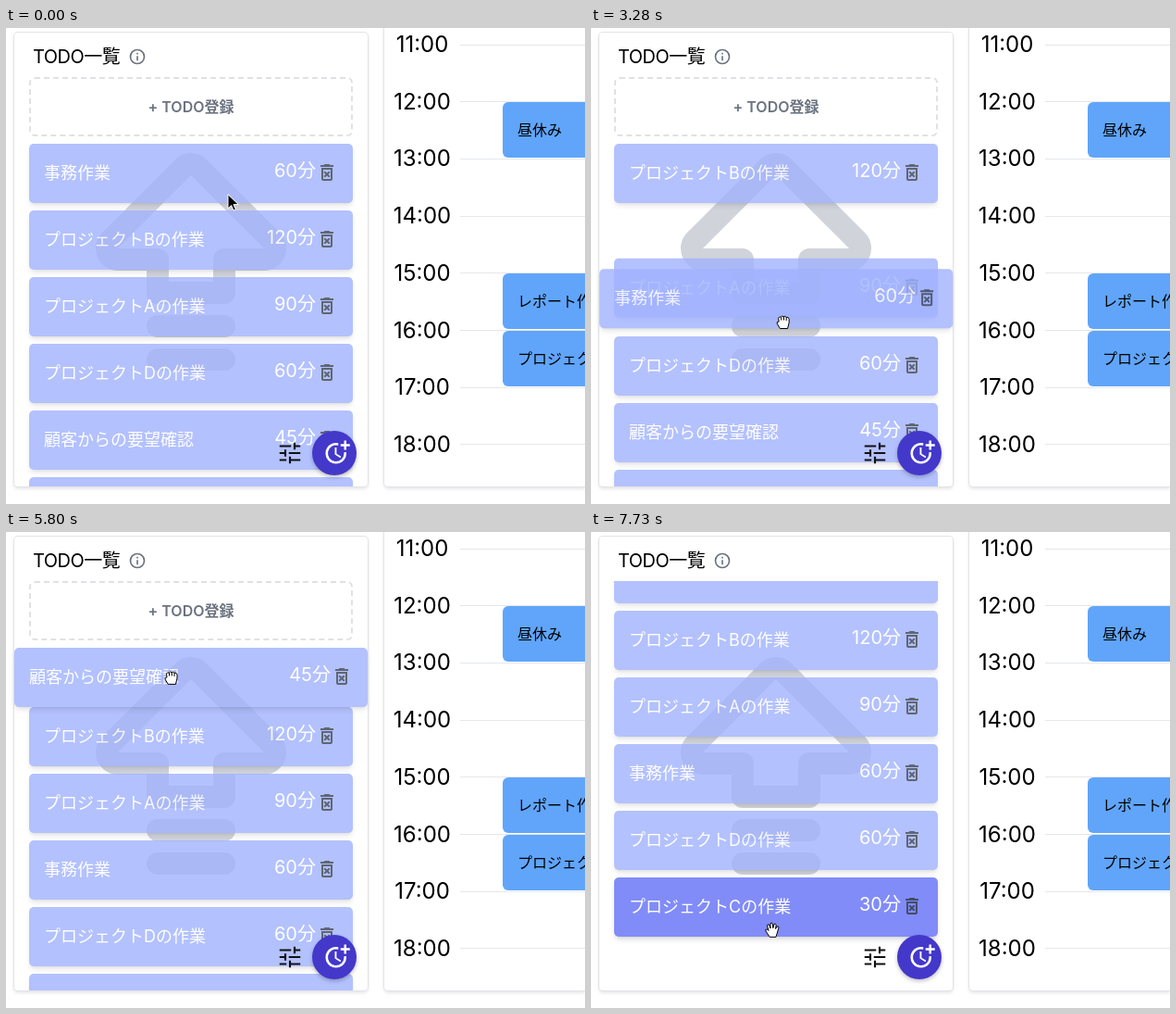
These frames come from a looping animation (626x514 px, 8 s). An HTML page:

```html
<!DOCTYPE html>
<html lang="ja">
<head>
<meta charset="utf-8">
<title>TODO</title>
<style>
html, body { margin: 0; width: 100%; height: 100%; overflow: hidden; background: #fff; }
body { font-family: Inter, "Noto Sans CJK JP", "Noto Sans CJK", sans-serif; color: #000; }
#stage { position: relative; width: 100%; height: 100%; overflow: hidden; contain: strict; }
#stage * { position: absolute; box-sizing: border-box; white-space: nowrap; }
#stage svg * { position: static; }
.panel { top: 5px; height: 490px; background: #fff; border-radius: 4px; box-shadow: 0 0 0 1px #e3e4e8, 0 2px 4px rgba(0,0,0,.14); }
#list { left: 9px; top: 53px; width: 382px; height: 442px; overflow: hidden; }
#add { left: 16px; width: 350px; height: 64px; border: 2px dashed #e0e1e4; border-radius: 6px;
  font-weight: 600; font-size: 16px; line-height: 60px; color: #6b7280; text-align: center; }
.card { left: 0; top: 0; width: 350px; height: 64px; border-radius: 5px; background: #a1b2fe; opacity: .8;
  box-shadow: 0 4px 6px -1px rgba(0,0,0,.12), 0 2px 4px -2px rgba(0,0,0,.12); color: #fff; }
.card.hover { background: #818cf8; opacity: 1; }
.card.drag { width: 382px; }
.card b { left: 16px; top: 17px; font-weight: 400; font-size: 18px; line-height: 30px; }
.card i { right: 40px; top: 14px; font-style: normal; font-size: 20px; line-height: 30px; }
.card svg { right: 16px; top: 18.5px; fill: #374151; }
.card.hover svg { fill-opacity: .85; }
.hour { left: 410px; width: 80px; text-align: center; font-size: 24px; line-height: 30px; }
.rule { left: 491px; width: 135px; height: 1px; background: #e5e7eb; }
.event { left: 537px; width: 89px; height: 60px; border-radius: 6px 0 0 6px; background: #60a5fa;
  padding-left: 16px; font-size: 16px; line-height: 60px; overflow: hidden; }
#fab { left: 331px; top: 435px; width: 48px; height: 48px; border-radius: 50%; background: #4338ca; box-shadow: 0 2px 4px rgba(0,0,0,.25); }
#cursor { left: 0; top: 0; overflow: visible; }
</style>
</head>
<body>
<div id="stage">
  <div class="panel" style="left:9px;width:382px"></div>
  <div class="panel" style="left:409px;width:217px;top:0;height:495px;border-radius:0 0 0 4px"></div>
  <div id="times"></div>
  <div style="left:29px;top:16px;font-size:20px;line-height:30px;letter-spacing:-.5px">TODO一覧</div>
  <svg style="left:132px;top:21px" width="20" height="20" viewBox="0 0 24 24" fill="#6b7280">
    <circle cx="12" cy="12" r="9" fill="none" stroke="#6b7280" stroke-width="2"/><path d="M11 7h2v2h-2zM11 11h2v6h-2z"/>
  </svg>
  <svg style="left:56px;top:106px" width="288" height="288" viewBox="0 0 24 24" fill="none" stroke="#d0d3da" stroke-width="2" stroke-linecap="round" stroke-linejoin="round">
    <path d="M9 12H5.414a1 1 0 0 1-.707-1.707l6.586-6.586a1 1 0 0 1 1.414 0l6.586 6.586a1 1 0 0 1-.707 1.707H15v3H9zM9 21h6M9 18h6"/>
  </svg>
  <div id="list"><div id="add">+ TODO登録</div></div>
  <div id="over" style="left:0;top:0"></div>
  <svg style="left:292px;top:444px" width="30" height="30" viewBox="0 0 24 24" stroke="#111" stroke-width="1.7">
    <path d="M3 6h10M16 3v6M16 6h5M3 12h5M8 9v6M11 12h10M3 18h6M12 15v6M12 18h9"/>
  </svg>
  <div id="fab"></div>
  <svg style="left:342.5px;top:442.5px" width="30" height="30" viewBox="0 0 24 24" fill="#fff">
    <path d="M10 8v6l4.7 2.9.8-1.2-4-2.4V8zM20 5V2h-2v3h-3v2h3v3h2V7h3V5z"/>
    <path d="M17.92 12c.05.33.08.66.08 1a7 7 0 1 1-5-6.71V4.23A9 9 0 1 0 19.94 12z"/>
  </svg>
  <svg id="cursor" width="1" height="1" stroke="#000" fill="#fff" stroke-linejoin="round" stroke-linecap="round">
    <path id="arrow" d="M0 0V15L3.6 11.6 6 17 8.4 16 6 10.6H11Z" fill="#000" stroke="#fff"/>
    <path id="open" d="M-3 7L-7 1Q-8-1.5-5.5-1L-4 .5-5.5-5Q-5-7-3.5-6L-2-2V-7Q-1-9 .3-7.2L.8-2.3 2-6.5Q3.5-7.5 4.2-6L3.6-1.5 5.2-4Q7-4.5 7-2.8L5 4 4 7Z"/>
    <path id="closed" d="M-4 7L-7 2Q-7.5-.5-5 0L-5.5-4Q-4.5-6-2.8-5Q-1.5-7 0-5.4Q1.8-6.6 3-4.8Q5.5-5.5 6-3V1L4.5 7ZM-2.5-2v-2.5M.3-2v-3M3-1.5v-3"/>
  </svg>
</div>
<script>
const $ = id => document.getElementById(id);
const LOOP = 8000, STEP = 148.8; // the picture advances in steps
const TOP = 125, PITCH = 72, CARD = 64, HOUR = 61.7;
const trash = '<svg width="24" height="24" viewBox="0 0 24 24"><path d="M14.12 10.47L12 12.59l-2.13-2.12-1.41 1.41L10.59 14l-2.12 2.12 1.41 1.41L12 15.41l2.12 2.12 1.41-1.41L13.41 14l2.12-2.12zM15.5 4l-1-1h-5l-1 1H5v2h14V4zM6 19c0 1.1.9 2 2 2h8c1.1 0 2-.9 2-2V7H6zM8 9h8v10H8z"/></svg>';

const clamp = u => Math.min(1, Math.max(0, u));
const smooth = u => u * u * (3 - 2 * u);
const easeOut = (t, start, end) => 1 - (1 - clamp((t - start) / (end - start))) ** 2;
const hourY = h => 18 + (h - 11) * HOUR;

function add(parent, cls, html, top) {
  const el = document.createElement('div');
  el.className = cls;
  el.innerHTML = html;
  if (top !== undefined) el.style.top = top + 'px';
  parent.append(el);
  return el;
}

for (let h = 11; h < 19; h++) {
  add($('times'), 'hour', h + ':00', hourY(h) - 15);
  add($('times'), 'rule', '', Math.round(hourY(h) - .5));
}
for (const [text, h] of [['昼休み', 12], ['レポート作成', 15], ['プロジェクトAの作業', 16]])
  add($('times'), 'event', text, Math.round(hourY(h)));

const cards = [['事務作業', 60], ['プロジェクトBの作業', 120], ['プロジェクトAの作業', 90],
  ['プロジェクトDの作業', 60], ['顧客からの要望確認', 45], ['プロジェクトCの作業', 30]]
  .map(([text, min]) => add($('list'), 'card', `<b>${text}</b><i>${min}分</i>${trash}`));
const [office, , , , client] = cards;

const home = { x: 240, y: 180 };
const moves = [
  { start: 950, end: 2100, x: 211, y: 164 },
  { start: 2580, end: 3485, x: 208, y: 326 },
  { start: 3740, end: 4380, x: 179, y: 450 },
  { start: 4600, end: 5450, x: 179, y: 157 },
  { start: 5830, end: 6400, x: 194, y: 296 },
  { start: 6850, end: 7730, x: 196, y: 430 }
];
const drags = [
  { card: office, press: 2200, lift: 2800, drop: 3850, slot: 2, goal: moves[1] },
  { card: client, press: 4440, lift: 4700, drop: 5900, slot: 0, goal: moves[3] }
];

function pointer(t) {
  let { x, y } = home;
  for (const m of moves) {
    const u = easeOut(t, m.start, m.end);
    x += (m.x - x) * u;
    y += (m.y - y) * u;
  }
  return { x, y };
}

// The held card keeps its distance to the pointer and ends in its slot
function heldAt(drag, t) {
  const { x, y } = pointer(t);
  return { x: 9 + x - drag.goal.x, y: TOP + PITCH * drag.slot + y - drag.goal.y };
}

function orderAt(t) {
  const order = [...cards];
  for (const d of drags.filter(d => t >= d.drop)) {
    order.splice(order.indexOf(d.card), 1);
    order.splice(d.slot, 0, d.card);
  }
  return order;
}

function put(el, x, y, parent) {
  if (el.parentNode !== parent) parent.append(el);
  el.style.transform = `translate(${x}px,${y}px)`;
}

function draw(now) {
  const t = Math.floor(now % LOOP / STEP + .1) * STEP;
  const at = pointer(t);
  const scroll = Math.round(112 * easeOut(t, 6400, 6886));
  const pressed = drags.find(d => t >= d.press && t < d.drop);
  const held = pressed && t >= pressed.lift ? pressed : null;
  const order = orderAt(t);

  $('add').style.transform = `translateY(${-scroll}px)`;
  order.filter(c => !held || c !== held.card).forEach((card, i) => {
    // Cards make room a little after the held card has passed
    const passed = held ? (heldAt(held, t - 300).y - TOP) / PITCH : 0;
    const room = held ? CARD * smooth(clamp(1 + i - passed)) : 0;
    put(card, 16, TOP - 53 + PITCH * i + room - scroll, $('list'));
  });
  if (held) {
    const { x, y } = heldAt(held, t);
    put(held.card, x, y, $('over'));
  }

  // Scrolling alone does not update the hovered card
  const seen = t < moves[5].start ? 0 : scroll;
  const under = order.find((c, i) => {
    const y = at.y + seen - TOP - PITCH * i;
    return y >= 0 && y < CARD;
  });
  const lit = t < moves[0].start || held ? null : pressed ? pressed.card : under;
  for (const card of cards) {
    card.classList.toggle('hover', card === lit);
    card.classList.toggle('drag', !!held && card === held.card);
  }

  const kind = t < moves[0].start ? 'arrow' : pressed ? 'closed' : 'open';
  $('cursor').style.transform = `translate(${at.x}px,${at.y}px)`;
  for (const id of ['arrow', 'open', 'closed']) $(id).style.display = id === kind ? '' : 'none';
}

const start = performance.now();
function tick() {
  draw(performance.now() - start);
  requestAnimationFrame(tick);
}
tick();
</script>
</body>
</html>
```
